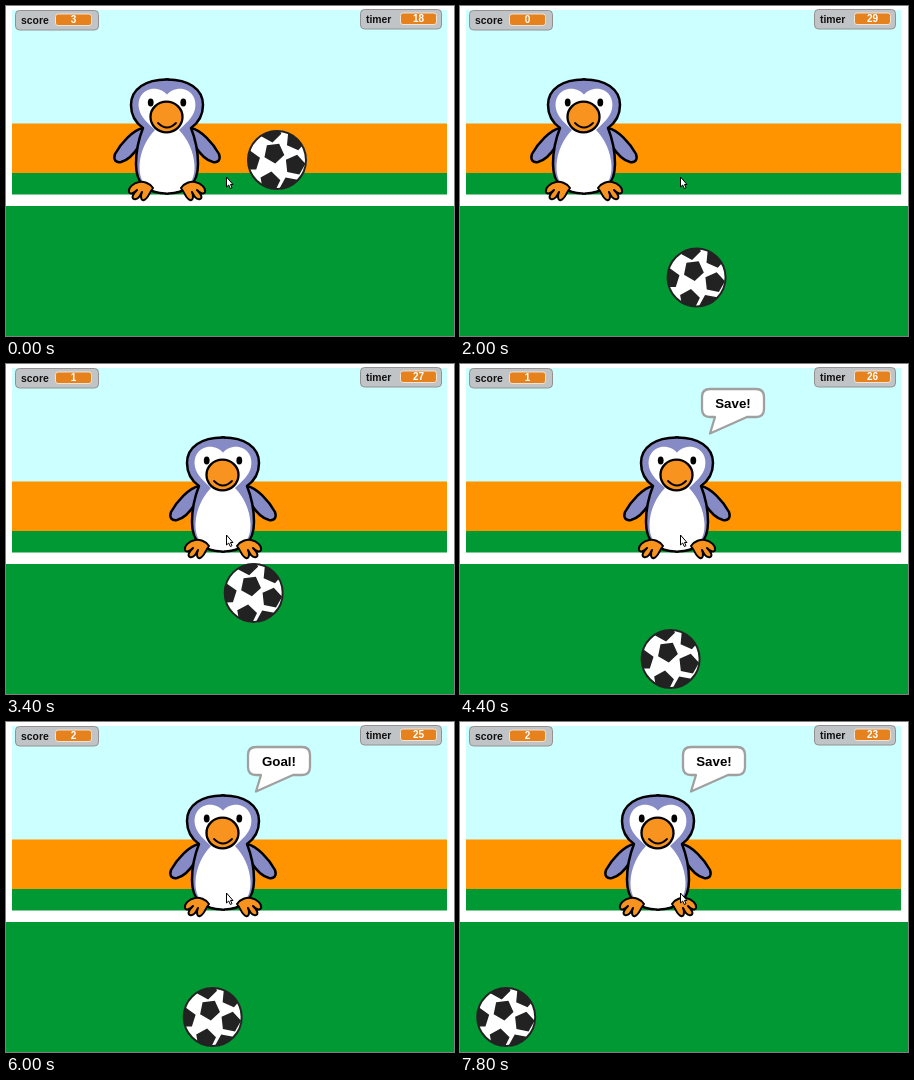
Write an HTML page that moves like this. It is 448x330 px and loops after 8000 ms.

```html
<!DOCTYPE html>
<html lang="en">
<head>
<meta charset="utf-8">
<title>Penguin goalkeeper</title>
<style>
html, body { margin: 0; width: 100%; height: 100%; overflow: hidden; background: #fff; }
svg { display: block; width: 100vw; height: 100vh; }
text { font-family: "Liberation Sans", Arial, sans-serif; font-weight: bold; }
.value { fill: #fff; font-size: 10px; text-anchor: middle; }
.label { fill: #111; font-size: 10.4px; }
</style>
</head>
<body>
<svg viewBox="0 0 448 330" preserveAspectRatio="none">
  <defs>
    <g id="back" fill="#878bc5" stroke="#000" stroke-width="2.500" stroke-linejoin="round" stroke-linecap="round">
      <path d="M24 122C34 124 46 137 52 148C54 154 51 157 46 156C38 154 33 148 28 140"/>
      <path d="M-1 73.500C21 73 36 83 36 99C36 110 31 117 24 122C28 132 31 144 31 158C31 178 21 187.500 -1 187.500"/>
    </g>
    <g id="front" stroke-linejoin="round">
      <path fill="#fff" d="M-1 90C3 84 10 82 16 83C25 85 30 93 28 103C26 112 18 118 12 124C20 132 27 145 27.500 160C28 177 19 186.300 -1 186.300"/>
      <path fill="#f7931e" stroke="#000" stroke-width="2" d="M14 182C17 177 24 175 28 176C34 177 39 182 38 186C37 189 33 187 30 184C34 188 36 192 33 193C29 194 27 190 25 186C27 190 26 195 23 194C19 193 18 187 14 182Z"/>
      <ellipse cx="16.300" cy="96.500" rx="2.900" ry="4"/>
    </g>
    <clipPath id="round"><circle r="29.500"/></clipPath>
  </defs>

  <path fill="#cff" d="M6 4H441V118H6Z"/>
  <path fill="#ff9400" d="M6 117.500H441V167H6Z"/>
  <path fill="#093" d="M6 167H441V188.500H6ZM0 200H448V330H0Z"/>

  <g id="penguin">
    <use href="#back"/>
    <use href="#back" transform="scale(-1 1)"/>
    <use href="#front"/>
    <use href="#front" transform="scale(-1 1)"/>
    <ellipse cx="-.5" cy="111" rx="16" ry="15.300" fill="#f7931e" stroke="#000" stroke-width="2.300"/>
    <path d="M-9 117Q0 126 9 117" fill="none" stroke="#000" stroke-width="1.800" stroke-linecap="round"/>
    <g id="bubble">
      <path fill="#fff" stroke="#a0a0a0" stroke-width="2.300" stroke-linejoin="round" d="M33 25H79Q87 25 87 33V45Q87 53 79 53H70L33 69.500L38 53H33Q25 53 25 45V33Q25 25 33 25Z"/>
      <text id="speech" x="56" y="43.500" font-size="13.300" text-anchor="middle"></text>
    </g>
  </g>

  <g id="ball">
    <circle r="29.500" fill="#fff"/>
    <path id="patches" clip-path="url(#round)" fill="#222"/>
    <circle r="29" fill="none" stroke="#222" stroke-width="2"/>
  </g>

  <g id="monitors"></g>
  <path fill="#fff" stroke="#000" d="M220.500 171V181L222.700 179L224.300 182.500L226 181.700L224.500 178.500H227Z"/>
</svg>
<script>
const LOOP = 8000, STEP = 200, KICKOFF = 200;
const LEFT = 42, RIGHT = 411, GROUND = 295, GOAL_LINE = 154;
const ROLL_SPEED = 0.281, RISE = 480, SAY = 1000;
const PACE = 9.3, PACE_TIME = 33;

const rounds = [
  { start: -14, kick: 1920, result: "Goal!" },
  { start: 2443, kick: 3175, result: "Save!" },
  { start: 3800, kick: 4914, result: "Goal!" },
  { start: 5414, kick: 6050, result: "Save!" },
  { start: 6550, kick: 7285, result: "Save!" },
  { start: 7785, kick: Infinity }
];
const moves = [
  { at: 1400, paces: -4 }, { at: 2300, paces: 9 }, { at: 2800, paces: 1 },
  { at: 6000, paces: -1 }, { at: 7400, paces: -1 }
];

const get = id => document.getElementById(id);
const place = (id, x, y) => get(id).setAttribute("transform", `translate(${x} ${y})`);
const clamp = (v, max) => Math.max(0, Math.min(v, max));

function pentagon(cx, cy, r, turn) {
  const points = Array.from({ length: 5 }, (_, i) => {
    const angle = turn + i * Math.PI * 2 / 5;
    return `${cx + r * Math.cos(angle)} ${cy + r * Math.sin(angle)}`;
  });
  return `M${points.join("L")}Z`;
}
const patchCentres = [[-3, -7], [-6, -28], [19, -20], [-27, 1], [18, 5], [-7, 22], [13, 27]];
get("patches").setAttribute("d", patchCentres.map(([x, y], i) =>
  pentagon(x, y, 10.5, i ? Math.atan2(-7 - y, -3 - x) : 0.2)).join(""));

function addMonitor(x, y, width, name) {
  get("monitors").insertAdjacentHTML("beforeend", `
    <g transform="translate(${x} ${y})">
      <rect x=".5" y=".5" width="${width}" height="19.500" rx="4" fill="#c1c4c7" stroke="#949191"/>
      <text class="label" x="6" y="13.500">${name}</text>
      <rect x="40.500" y="4" width="36" height="11.500" rx="2.500" fill="#e6821e" stroke="#efe3d6"/>
      <text class="value" id="${name}" x="58.500" y="13.200"></text>
    </g>`);
}
addMonitor(9, 4, 83, "score");
addMonitor(354, 3, 81, "timer");

// The ball rolls between the edges, then rises straight up once kicked.
function ballAt(t, { start, kick }) {
  const span = RIGHT - LEFT;
  const rolled = (Math.min(t, kick) - start) * ROLL_SPEED % (2 * span);
  const lift = clamp((t - kick) / RISE, 1);
  return [LEFT + span - Math.abs(span - rolled), GROUND + (GOAL_LINE - GROUND) * lift];
}

function penguinAt(t) {
  return moves.reduce((x, { at, paces }) =>
    x + Math.sign(paces) * PACE * clamp((t - at) / PACE_TIME, Math.abs(paces)), 161);
}

function draw(t) {
  const playing = t >= KICKOFF;
  const index = rounds.findLastIndex(r => r.start <= t);
  const said = rounds.find(r => t >= r.kick + RISE && t < r.kick + RISE + SAY);
  const goals = rounds.slice(0, index).filter(r => r.result === "Goal!").length;

  place("ball", ...(playing ? ballAt(t, rounds[index]) : [271, GOAL_LINE]));
  place("penguin", Math.round(penguinAt(t)), 0);
  get("bubble").setAttribute("visibility", said ? "visible" : "hidden");
  get("speech").textContent = said ? said.result : "";
  get("score").textContent = playing ? goals : 3;
  get("timer").textContent = playing ? 30 - Math.floor((t - KICKOFF) / 1000) : 18;
}

const begin = performance.now();
function tick() {
  const t = (performance.now() - begin) % LOOP;
  draw(Math.floor(t / STEP) * STEP);
  requestAnimationFrame(tick);
}
tick();
</script>
</body>
</html>
```
